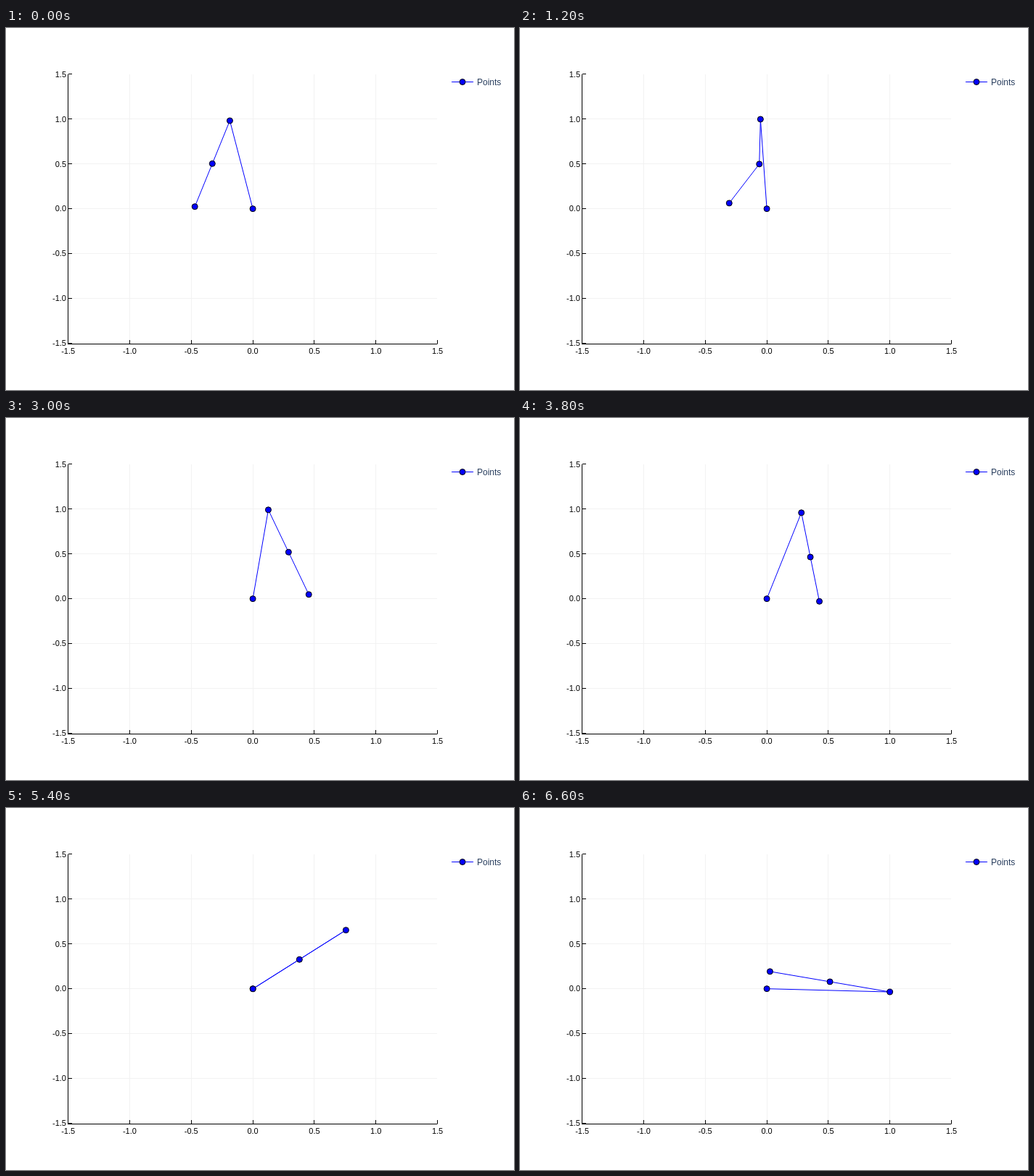
An HTML page for the animation above (6.67 s loop, 700 by 500 pixels).

```html
<!DOCTYPE html>
<html>
<head>
<meta charset="utf-8">
<style>
  html, body { margin: 0; width: 100%; height: 100%; overflow: hidden; background: #fff; }
  svg { display: block; font: 11px "Liberation Sans", Arial, sans-serif; }
  .grid { stroke: #f2f2f2; }
  .axis { stroke: #000; fill: none; }
  .link { stroke: #00f; fill: none; }
  circle { fill: #00f; stroke: #000; }
</style>
</head>
<body>
<svg id="stage" width="700" height="500" viewBox="0 0 700 500"></svg>
<script>
const LOOP = 6670, FRAMES = 100, STRIKE = 0.375;
const stage = document.getElementById("stage");
const px = x => 340.1 + 169.65 * x;
const py = y => 249.65 - 123.8 * y;
const crisp = v => Math.floor(v) + 0.5;

function add(tag, attrs, text = "") {
  const el = document.createElementNS("http://www.w3.org/2000/svg", tag);
  for (const key in attrs) el.setAttribute(key, attrs[key]);
  el.textContent = text;
  stage.append(el);
  return el;
}
const path = (cls, d) => add("path", { class: cls, d });
const dot = (cx, cy) => add("circle", { cx, cy, r: 4 });

// Axes, grid and tick labels
const ticks = [-3, -2, -1, 0, 1, 2, 3].map(n => n / 2);
for (const v of ticks.slice(1, -1)) {
  path("grid", `M${crisp(px(v))} 64V436M86 ${crisp(py(v))}H594`);
}
path("axis", "M85.5 64V437M85 436.5H594.5".replace("436.5", crisp(436)));
for (const v of ticks) {
  const label = v.toFixed(1);
  path("axis", `M${crisp(px(v))} 436V431M86 ${crisp(py(v))}H91`);
  add("text", { x: px(v), y: 450, "text-anchor": "middle" }, label);
  add("text", { x: 83, y: py(v) + 3.8, "text-anchor": "end" }, label);
}

// Legend
path("link", "M614 74.5H644");
dot(629, 74.5);
add("text", { x: 649, y: 79, "font-size": 12, fill: "#2a3f5f" }, "Points");

// The polynomial through a few points (t, angle)
const curve = (times, angles) => t =>
  angles.reduce((sum, angle, i) => sum + times.reduce(
    (term, other, j) => j === i ? term : term * (t - other) / (times[i] - other),
    angle), 0);

// Leg angles from the vertical, in radians; the knee locks at STRIKE
const bending = [0, 0.09, 0.18, 0.3, STRIKE];
const stance = curve([0, 0.18, 0.3, 0.57, 0.81, 0.99],
  [0.1877, 0.0515, -0.0094, -0.2845, -0.8576, -1.6064]);
const thigh = curve(bending, [-0.2884, -0.214, -0.019, 0.2454, 0.326]);
const shank = curve(bending, [-0.2884, -0.386, -0.511, -0.239, 0.326]);
const locked = curve([STRIKE, 0.45, 0.57, 0.69, 0.84, 0.99],
  [0.326, 0.335, 0.1468, -0.28, -1.0105, -1.8007]);

const legs = path("link", "");
const joints = [0, 1, 2, 3].map(() => dot(0, 0));
const hang = ([x, y], q) => [x + Math.sin(q) / 2, y - Math.cos(q) / 2];

function draw(t) {
  const q = stance(t);
  const hip = [-Math.sin(q), Math.cos(q)];
  const knee = hang(hip, (t < STRIKE ? thigh : locked)(t));
  const foot = hang(knee, (t < STRIKE ? shank : locked)(t));
  const points = [[0, 0], hip, knee, foot].map(([x, y]) => [px(x), py(y)]);
  legs.setAttribute("d", "M" + points.join("L"));
  points.forEach(([x, y], i) => {
    joints[i].setAttribute("cx", x);
    joints[i].setAttribute("cy", y);
  });
}

const start = performance.now();
function tick() {
  const ms = (performance.now() - start) % LOOP;
  const step = Math.min(FRAMES - 1, Math.floor((ms + 3.4) * 3 / 200));
  draw(step / 100);
  requestAnimationFrame(tick);
}
tick();
</script>
</body>
</html>
```
